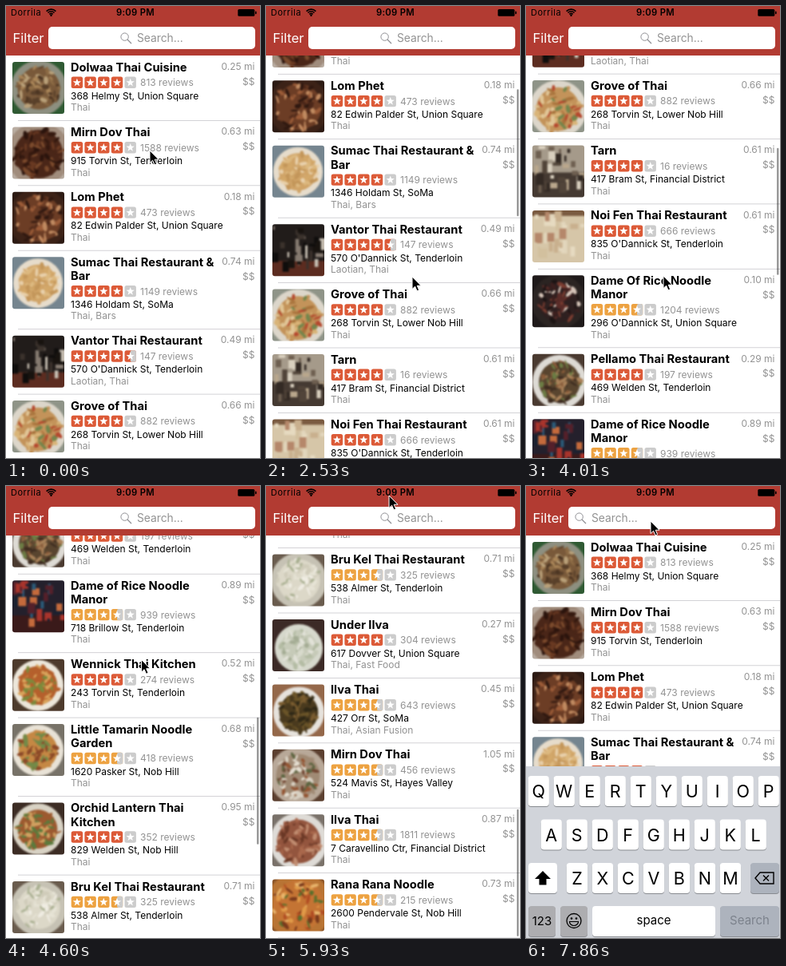
These frames come from a looping animation (318x566 px, 8000 ms). An HTML page:

```html
<!DOCTYPE html>
<html lang="en">
<head>
<meta charset="utf-8">
<title>Restaurant list</title>
<style>
html, body { margin: 0; width: 100%; height: 100%; overflow: hidden; background: #fff }
svg { display: block; width: 318px; height: 566px; font: 12px Inter, sans-serif }
.name { font-size: 14.7px; font-weight: 700 }
.grey { fill: #929292 }
.right { text-anchor: end }
.mid { text-anchor: middle }
.key { font-size: 21.5px; text-anchor: middle }
.label { font-size: 15px; text-anchor: middle }
.photo { filter: blur(.8px) }
</style>
</head>
<body>
<svg id="stage" viewBox="0 0 318 566"></svg>
<script>
// name / second line | miles | rating | reviews | address | cuisine | photo
// photo: background, plate colour, plate x y r (r = 0: interior with floor at y), detail colours
const rows = `Dolwaa Thai Cuisine|0.25|4|813|368 Helmy St, Union Square|Thai|#2f5a33 #8d8f80 33 33 35 #79593a #59402a #a98558 #4c3522 #8c6b45 #b9a079
Mirn Dov Thai|0.63|4|1588|915 Torvin St, Tenderloin|Thai|#b9ada2 #a08c7c 33 34 40 #4a2618 #6a3a22 #35190f #7b4a2c #2b140d
Lom Phet|0.18|4|473|82 Edwin Palder St, Union Square|Thai|#2c1a13 #3c2217 33 33 38 #6c3d25 #9c5c38 #c08a60 #4b2719 #2f1810
Sumac Thai Restaurant &/Bar|0.74|4|1149|1346 Holdam St, SoMa|Thai, Bars|#75858f #e6dccb 32 33 31 #d0a468 #dcb87f #d3a869 #e8d0ab #c3965a
Vantor Thai Restaurant|0.49|4.5|147|570 O'Dannick St, Tenderloin|Laotian, Thai|#211c1a #5c2c20 0 46 0 #3b322c #18130f #857a70 #0f0d0c #c4bcb0
Grove of Thai|0.66|4|882|268 Torvin St, Lower Nob Hill|Thai|#8f9488 #dcd6ca 32 36 36 #c3935a #d9b478 #a8733c #b5482e #74864c #e0c596
Tarn|0.61|4|16|417 Bram St, Financial District|Thai|#a59a8a #453a32 0 34 0 #d8cfbe #6e5f50 #332a24 #b9a78c #514439
Noi Fen Thai Restaurant|0.61|4|666|835 O'Dannick St, Tenderloin|Thai|#7a5a40 #d6c6a8 0 7 0 #e2d6bc #c9b08e #e6dac0 #b5876a #d2c09e
Dame Of Rice Noodle/Manor|0.10|3.5|1204|296 O'Dannick St, Union Square|Thai|#1f1a1a #2b2422 33 33 34 #2e2020 #5a2c28 #7a3c30 #d5c4b8 #3d1f1e #1c1414
Pellamo Thai Restaurant|0.29|4|197|469 Welden St, Tenderloin|Thai|#4a3a30 #dddad4 34 35 34 #59452f #8a5c3a #6c7c44 #3e2c20 #a9825a
Dame of Rice Noodle/Manor|0.89|3.5|939|718 Brillow St, Tenderloin|Thai|#24202c #3a1a1a 0 44 0 #a8342c #2b5a78 #54202a #c46a3c #1a2030
Wennick Thai Kitchen|0.52|4|274|243 Torvin St, Tenderloin|Thai|#4d3a2c #ece6da 32 33 32 #b5602c #7c8a3c #d9a45c
Little Tamarin Noodle/Garden|0.68|3.5|418|1620 Pasker St, Nob Hill|Thai|#777268 #e8e2d6 32 33 32 #c58844 #8c4a28 #738a48
Orchid Lantern Thai/Kitchen|0.95|4|352|829 Welden St, Nob Hill|Thai|#3c2c24 #d8d2c4 32 33 32 #9c5a30 #d0a060 #5c7a3c
Bru Kel Thai Restaurant|0.71|3.5|325|538 Almer St, Tenderloin|Thai|#6a5c4e #c6c2b4 33 33 35 #dcd8c8 #efece2 #d0ccba #e6e3d5 #aab092
Under Ilva|0.27|4|304|617 Dovver St, Union Square|Thai, Fast Food|#3c2a26 #d6d8cc 33 36 30 #c6cab8 #b4bca4 #e2e2d8 #a4ac94 #d8dacc
Ilva Thai|0.45|3.5|643|427 Orr St, SoMa|Thai, Asian Fusion|#94684a #e6e2dc 33 35 32 #4a3a1e #6a5428 #2f2816 #7a5c30
Mirn Dov Thai|1.05|3.5|456|524 Mavis St, Hayes Valley|Thai|#5c4030 #b8a898 32 33 36 #a08a74 #e4ddd0 #945634 #d8d0c2 #5c6440 #704430
Ilva Thai|0.87|3.5|1811|7 Caravellino Ctr, Financial District|Thai|#7a726a #dedbd6 33 34 36 #93553e #a9684c #c08c70 #6a3826
Rana Rana Noodle|0.73|3.5|215|2600 Pendervale St, Nob Hill|Thai|#8a5428 #b87434 33 33 42 #c47434 #e09a48 #b04c22 #59702c #e8b46c #7a3a1c`
  .split("\n").map(line => line.split("|"));

const rect = (x, y, w, h, fill, r = 0, more = "") =>
  `<rect x="${x}" y="${y}" width="${w}" height="${h}" fill="${fill}" rx="${r}" ${more}/>`;
const circle = (x, y, r, fill = "#000", more = "") =>
  `<circle cx="${x}" cy="${y}" r="${r}" fill="${fill}" ${more}/>`;
const text = (x, y, str, cls = "", more = "") =>
  `<text x="${x}" y="${y}" class="${cls}" ${more}>${str}</text>`;
const line = (d, width = 1, color = "#000", fill = "none") =>
  `<path d="${d}" stroke="${color}" stroke-width="${width}" fill="${fill}"/>`;

function random(seed) {
  return () => (seed = seed * 16807 % 2147483647) / 2147483647;
}

function photo(spec, seed) {
  const [back, plate, x, y, r, ...colors] = spec.split(" ");
  const rnd = random(seed * 7919 + 13);
  let out = rect(-2, -2, 69, 69, back);
  if (+r) {
    out += circle(x, y, r, plate) + circle(x, y, r * .76, colors[0]);
    for (let i = 0; i < 70; i++) {
      const a = rnd() * 6.28, d = Math.sqrt(rnd()) * r * .76;
      const cx = +x + d * Math.cos(a), cy = +y + d * Math.sin(a);
      out += `<ellipse cx="${cx}" cy="${cy}" rx="${2.5 + rnd() * 4}" ry="${1 + rnd() * 2}"
        fill="${colors[i % colors.length]}" transform="rotate(${rnd() * 180} ${cx} ${cy})"/>`;
    }
  } else {
    out += rect(-2, y, 69, 69, plate);
    for (let i = 0; i < 28; i++)
      out += rect(rnd() * 62 - 2, rnd() * 48, 2 + rnd() * 8, 3 + rnd() * 14, colors[i % colors.length]);
  }
  return `<g clip-path="url(#round)"><g class="photo">${out}</g></g>`;
}

const starPoints = Array.from({ length: 10 }, (_, i) => {
  const r = i % 2 ? 2.2 : 5.4, a = i * Math.PI / 5;
  return [7.2 + r * Math.sin(a), 7.4 - r * Math.cos(a)];
}).join(" ");

function stars(rating) {
  const color = rating < 4 ? "#eda241" : "#dc5a37";
  return [0, 1, 2, 3, 4].map(i => {
    const part = Math.max(0, Math.min(1, rating - i));
    return `<g transform="translate(${81.7 + i * 16.7})">` +
      rect(0, 0, 14.4, 14.4, part ? color : "#ccc", 2.5) +
      (part === .5 ? rect(7.2, 0, 7.2, 14.4, "#ccc", 2) : "") +
      `<polygon points="${starPoints}" fill="#fff"/></g>`;
  }).join("");
}

let contentHeight = 0;
const list = rows.map(([name, miles, rating, reviews, address, cuisine, pic], i) => {
  const names = name.split("/"), extra = (names.length - 1) * 17.1, top = contentHeight;
  contentHeight += 81.4 + extra;
  return `<g transform="translate(0 ${top})">
    <g transform="translate(8 8)">${photo(pic, i + 1)}</g>` +
    names.map((n, j) => text(81, 19.5 + j * 17.5, n, "name")).join("") +
    text(311.5, 17.8, miles + " mi", "grey right") + text(311.5, 36.5, "$$", "grey right") +
    `<g transform="translate(0 ${extra})"><g transform="translate(0 26.6)">${stars(+rating)}</g>` +
    text(168, 38.3, reviews + " reviews", "grey") + text(81, 54.6, address) +
    text(81, 69.2, cuisine, "grey") + rect(15, 81, 303, .8, "#c8c7cc") + "</g></g>";
}).join("");

const key = (x, y, w, fill = "#fff") =>
  rect(x, y + 1, w, 38, "#888b90", 4) + rect(x, y, w, 38, fill, 4);
const letters = (str, x, y) => [...str].map((c, i) =>
  key(x + i * 32, y, 26.3) + text(x + i * 32 + 13.1, y + 27, c, "key")).join("");

const keyboard = rect(0, 351, 318, 216, "#d1d4da") +
  letters("QWERTYUIOP", 2.6, 363) + letters("ASDFGHJKL", 18.6, 417.5) + letters("ZXCVBNM", 50.8, 472) +
  key(3, 472, 36) + `<path d="M21 482l-10 10h5.5v7.5h9V492H31z"/>` +
  key(281, 472, 36, "#adb3bd") + line("M287 491l6-7H310V498H293zM297 487.5l7 7m0-7l-7 7", 1.4) +
  key(3, 526, 34, "#adadb0") + text(20, 550, "123", "label") +
  key(43, 526, 34, "#adadb0") +
  circle(60, 544.5, 9, "none", 'stroke="#000" stroke-width="1.3"') +
  circle(57, 541.5, 1.3) + circle(63, 541.5, 1.3) +
  line("M54.5 545.5H65.5A5.5 5 0 0 1 54.5 545.5z", 1.2) +
  key(83, 526, 154) + text(160, 549, "space", "label") +
  key(243, 526, 74, "#adb3bd") + text(280, 549, "Search", "label", 'fill="#7c828c"');

const wifi = [3, 5.6, 8.2].map(r => {
  const d = r * .72, y = 12.5 - d;
  return line(`M${56.5 - d} ${y}A${r} ${r} 0 0 1 ${56.5 + d} ${y}`, 1.6);
}).join("") + circle(56.5, 11.8, 1.2);

const $ = id => document.getElementById(id);
$("stage").innerHTML = `
  <clipPath id="round"><rect width="65" height="65" rx="3"/></clipPath>
  <g id="list">${list}</g>
  <rect id="thumb" x="314" width="2.5" rx="1.2"/>
  ${rect(0, 0, 318, 62, "#b23b32")}
  ${text(6, 12.3, "Dorrila", "", 'font-size="11" letter-spacing=".5"')}${wifi}
  ${text(162, 12.3, "9:09 PM", "mid", 'font-size="11.3" font-weight="600" letter-spacing=".3"')}
  ${rect(290.3, 4, 21, 8.8, "#000", 1.5)}${rect(312, 6.6, 1.6, 3.6, "#000", .8)}
  ${text(8.5, 46, "Filter", "", 'font-size="16.5" fill="#fff"')}
  ${rect(53, 26, 259, 28, "#fff", 5)}
  <g id="hint">${circle(148.6, 38.6, 4.7, "none", 'stroke="#8e8e93"')}
    ${line("M152 42l5 5", 1.2, "#8e8e93")}${text(164, 45, "Search...", "grey", 'font-size="13.8"')}</g>
  <g id="keyboard">${keyboard}</g>
  <g id="pointer">${line("M0 0V15.5L3.6 12.2 6 17.8 8.6 16.7 6.2 11.2H11z", 1, "#fff", "#000")}</g>`;

const LOOP = 8000, START = 1500, TICK = 147, NAV = 62;
const VIEW = 566 - NAV, maxScroll = contentHeight - VIEW;

// tick, pointer x, pointer y, scroll
const path = [
  [-7, 180, 181, 0], [-4, 189, 279, 0], [1, 189, 279, 0], [3, 186, 215, 66], [5, 184, 290, 122],
  [7, 183, 339, 139.5], [8, 183, 330, 149], [10, 180, 245, 235], [13, 176, 325, 370],
  [17, 172, 338, 401], [18, 172, 328, 411], [20, 170, 225, 640], [22, 169, 210, 960],
  [24, 169, 215, 1212], [25, 169, 217, 1228], [27, 168, 190, maxScroll], [30, 154, 12, maxScroll],
  [31, 153, 10, 1080], [32, 153, 10, 640], [33, 153, 10, 230], [34, 153, 10, 40],
  [35, 153, 10, 0], [37, 153, 10, 0], [39, 156, 44, 0]
];

function pose(k) {
  const i = path.findIndex(p => p[0] > k);
  if (i === 0) return path[0];
  if (i < 0) return path[path.length - 1];
  const a = path[i - 1], b = path[i], f = (k - a[0]) / (b[0] - a[0]);
  return a.map((v, j) => v + (b[j] - v) * f);
}

const move = (id, x, y) => $(id).setAttribute("transform", `translate(${x} ${y})`);

function draw(now) {
  const k = Math.floor((now % LOOP - START) / TICK);
  const [, x, y, scroll] = pose(k);
  const over = Math.max(0, scroll - maxScroll);
  const open = k < 41 ? 0 : [.35, .85, 1][Math.min(k - 41, 2)];
  move("list", 0, NAV - scroll);
  move("pointer", x, y);
  move("hint", -82 * open, 0);
  move("keyboard", 0, 215 * (1 - open));
  const thumb = $("thumb");
  thumb.setAttribute("y", 65 + .281 * (scroll - over) + over);
  thumb.setAttribute("height", 159 - over);
  thumb.setAttribute("opacity", k < 2 || k > 40 ? 0 : k < 35 ? .4 : .2);
  requestAnimationFrame(draw);
}
requestAnimationFrame(draw);
</script>
</body>
</html>
```
